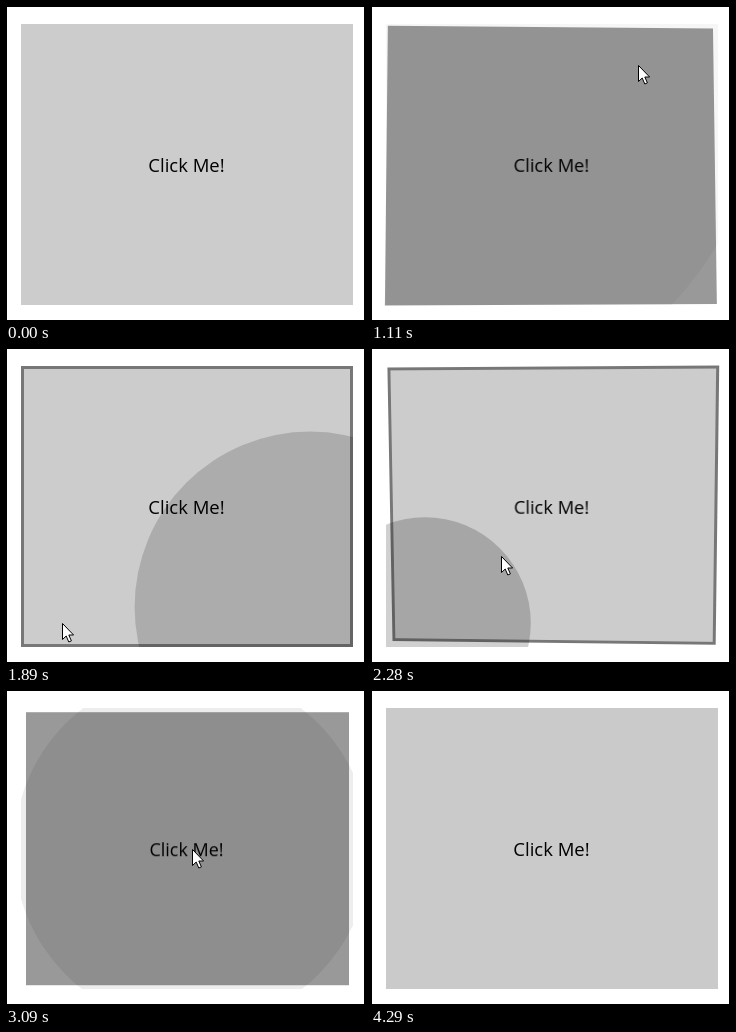
Recreate the animation shown at these times as an HTML page. Size 359 by 314 pixels, loop 4590 ms.

```html
<!DOCTYPE html>
<html lang="en">
<head>
<meta charset="utf-8">
<title>Ripple button</title>
<style>
  html, body { margin: 0; width: 100%; height: 100%; overflow: hidden; background: #fff; }
  #stage {
    position: absolute; left: 0; top: 0; width: 359px; height: 314px; overflow: hidden;
    box-sizing: border-box; border: 1px solid #000; border-bottom: 0;
  }
  #tile {
    position: absolute; left: 14px; top: 17px; width: 332px; height: 281px;
    font: 18.5px/25px "Open Sans", "Noto Sans", sans-serif; color: #000;
  }
  #tile span { position: absolute; left: 0; top: 128px; width: 331px; text-align: center; }
  #overlay { position: absolute; left: -1px; top: -1px; }
</style>
</head>
<body>
<div id="stage">
  <div id="tile"><span>Click Me!</span></div>
  <svg id="overlay" width="359" height="314">
    <svg id="ripples" x="15" y="18" width="332" height="281" viewBox="15 18 332 281" overflow="hidden"></svg>
    <path id="cursor" d="M.5 .5V16.5L4.2 13L6.8 19L9.4 17.9L6.8 12H11.6Z" fill="#fff" stroke="#000"/>
  </svg>
</div>
<script>
const LOOP = 4590, RIPPLE = 560, TRAVEL = 275, ENTER = 60, LEAVE = 4110;
const MID = { x: 181, y: 158.5 }, HALF = { w: 166, h: 140.5 };
const byId = id => document.getElementById(id);
const tile = byId('tile'), cursor = byId('cursor');

const clamp = v => Math.min(1, Math.max(0, v));
const ease = v => { v = clamp(v); return v * v * (3 - 2 * v); };
const mix = (a, b, u) => a + (b - a) * u;

// Four corners, then the middle three times: x, y, time
const clicks = [
  [46, 59, 602], [267, 59, 1130], [304, 259, 1630], [54, 275, 2129],
  [186, 159, 2641], [186, 159, 3099], [186, 159, 3345]
].map(([x, y, start]) => {
  const dx = x - MID.x, dy = y - MID.y, dot = document.createElementNS('http://www.w3.org/2000/svg', 'circle');
  dot.setAttribute('cx', x);
  dot.setAttribute('cy', y);
  byId('ripples').append(dot);
  return {
    x, y, start, dot,
    down: start - 40,
    corner: Math.abs(dx) > 20,
    sx: Math.sign(dx), sy: Math.sign(dy),
    reach: Math.hypot(HALF.w + Math.abs(dx), HALF.h + Math.abs(dy))
  };
});

// The pointer rests at each stop and sets off for the next at its start time
const stops = [
  { x: 330, y: 190, start: ENTER, travel: 410 },
  ...clicks,
  { x: MID.x + 5, y: 159, start: 3700, travel: 400 },
  { x: 362, y: 200, start: LEAVE }
];

function pointerAt(t) {
  const i = stops.findLastIndex(s => t >= s.start);
  const from = stops[i], to = stops[i + 1];
  const u = ease((t - from.start) / (from.travel || TRAVEL));
  return [Math.round(mix(from.x, to.x, u)), Math.round(mix(from.y, to.y, u))];
}

function drawRipples(t) {
  for (const { start, reach, dot } of clicks) {
    const p = clamp((t - start) / RIPPLE);
    dot.setAttribute('r', reach * p);
    dot.setAttribute('fill-opacity', 0.2 * (1 - p * p));
  }
}

function tilt(t, c) {
  const hold = c.corner ? 155 : 30;
  const amount = ease((t - c.down) / 30) * (1 - ease((t - c.start - hold) / 100));
  if (!amount) return 'none';
  const turn = c.corner ? `rotate3d(${-3 * c.sy}, ${2 * c.sx}, 0, ${6.6 * amount}deg)` : '';
  return `perspective(1000px) translateZ(${(c.corner ? -12 : -31) * amount}px) ${turn}`;
}

function drawTile(t) {
  const hover = t >= ENTER && t < LEAVE;
  const last = clicks.findLast(c => t >= c.down);
  const pressed = last && t < last.start + 30;
  tile.style.background = pressed ? '#999' : t < LEAVE ? '#ccc' : '#cacaca';
  tile.style.boxShadow = hover && !pressed ? 'inset 0 0 0 3px #777' : 'none';
  tile.style.transform = last ? tilt(t, last) : 'none';
}

function draw(t) {
  drawTile(t);
  drawRipples(t);
  const shown = t >= ENTER && t < LEAVE;
  cursor.style.display = shown ? '' : 'none';
  if (shown) cursor.setAttribute('transform', `translate(${pointerAt(t)})`);
}

const begin = performance.now();
function tick() {
  draw((performance.now() - begin) % LOOP);
  requestAnimationFrame(tick);
}
tick();
</script>
</body>
</html>
```
